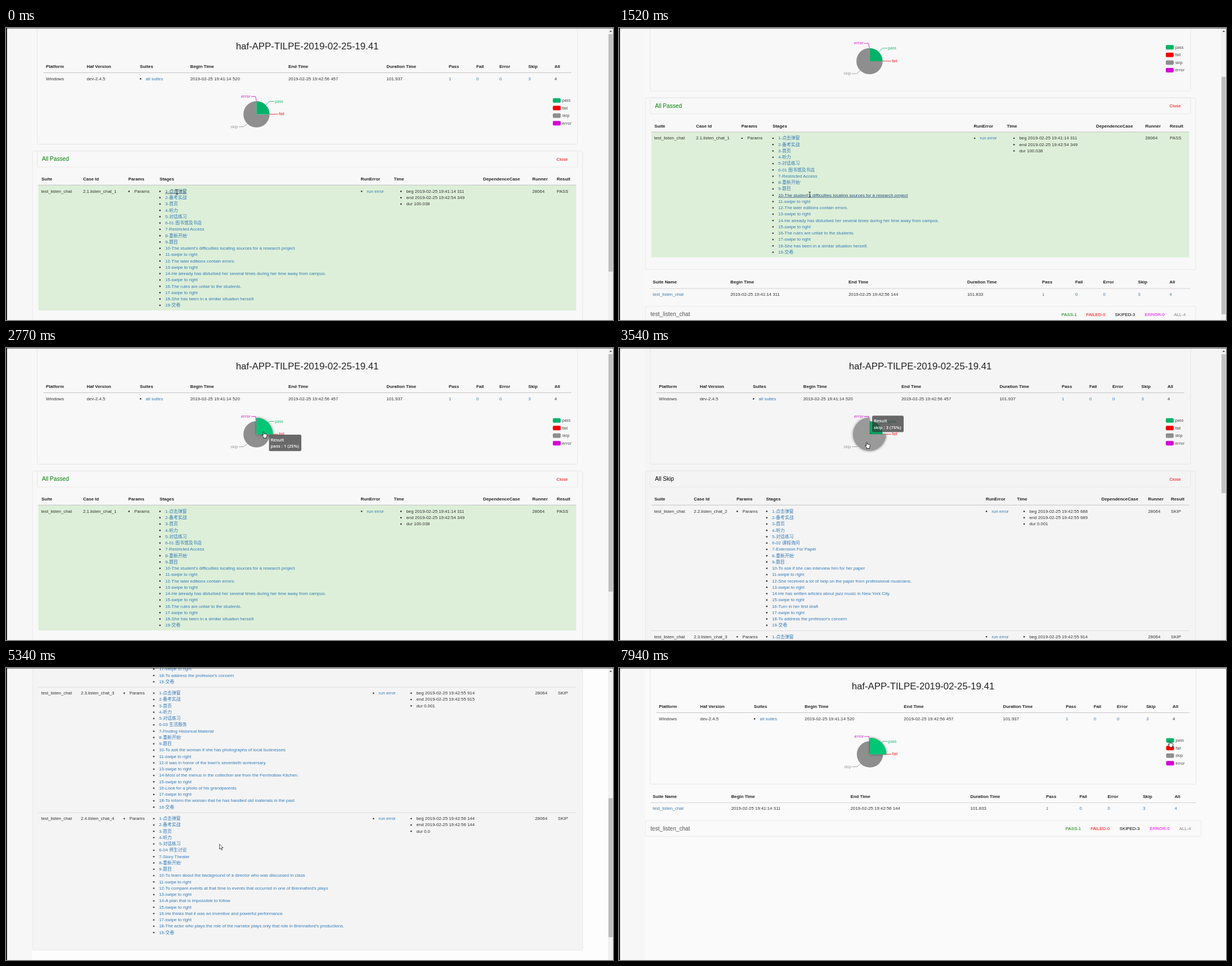
An HTML page for the animation above (8000 ms loop, 1079 by 519 pixels).

```html
<!DOCTYPE html>
<html lang="zh-CN">
<head>
<meta charset="utf-8">
<title>Test report</title>
<style>
html, body { margin: 0; width: 100%; height: 100%; overflow: hidden; background: #f8f8f8; }
svg { display: block; width: 1079px; height: 519px; }
text { font: 7.875px "Liberation Sans", "Noto Sans CJK SC", "Noto Sans CJK", sans-serif; white-space: pre; }
.b { font-weight: bold; }
.h { font-size: 10.125px; }
.title { font-size: 16.8px; text-anchor: middle; }
.chart { font: 7px "Open Sans", "Noto Sans", sans-serif; }
.tip { font: 600 7.8px "Open Sans", "Noto Sans", sans-serif; }
.up { filter: drop-shadow(0 0 2px rgba(0,0,0,.5)); }
</style>
</head>
<body>
<svg id="stage" viewBox="0 0 1079 519"></svg>
<script>
const LOOP = 8000, INK = '#333', LINK = '#337ab7', BORDER = '#e4e4e4';
const LINE = 11.25, ROW = 222.9, VIEW = 525;
const stage = document.getElementById('stage');

// [start, end, count] of each run of screen updates
const bursts = [[860, 1790, 8], [1930, 2910, 8], [3030, 4070, 9], [4200, 5210, 7],
  [5340, 6300, 8], [6450, 7410, 8], [7530, 7940, 4]];
const pointer = [[860, 304, 291.5], [1380, 339, 296], [1940, 339, 296], [2620, 458, 148.5],
  [3030, 458, 148.5], [3280, 440.5, 167], [3820, 440.5, 167], [4070, 379.5, 313],
  [5340, 379.5, 313], [5880, 580.5, 108.5], [6170, 580.5, 108.5], [6700, 987, 231],
  [6900, 987, 231], [7400, 979, 170], [7530, 979, 170], [7930, 979, 129.5]];
const scrolling = [[780, 0], [1500, 94.4], [1930, 94.4], [2350, 0], [4070, 0],
  [4690, 548.5], [5210, 548.5], [5750, 0]];

const open = ['点击弹窗', '备考实战', '首页', '听力', '对话练习'];
const stages = (topic, title, answers) => {
  const list = [...open, topic, title, "重新开始'", '题目'];
  answers.forEach((a, i) => list.push(a, i < 4 ? 'swipe to right' : '交卷'));
  return list.map((s, i) => `${i + 1}-${s}`);
};
const passed = [{
  id: '2.1.listen_chat_1', beg: '41:14 311', end: '42:54 349', dur: '100.038',
  list: stages('01 图书馆及书店', 'Restricted Access', [
    'The student’s difficulties locating sources for a research project',
    'The later editions contain errors.',
    'He already has disturbed her several times during her time away from campus.',
    'The rules are unfair to the students.',
    'She has been in a similar situation herself.'])
}];
const skipped = [{
  id: '2.2.listen_chat_2', beg: '42:55 688', end: '42:55 689', dur: '0.001',
  list: stages('02 课程询问', 'Extension For Paper', [
    'To ask if she can interview him for her paper',
    'She received a lot of help on the paper from professional musicians.',
    'He has written articles about jazz music in New York City.',
    'Turn in her first draft',
    "To address the professor's concern"])
}, {
  id: '2.3.listen_chat_3', beg: '42:55 914', end: '42:55 915', dur: '0.001',
  list: stages('03 生活服务', 'Finding Historical Material', [
    'To ask the woman if she has photographs of local businesses',
    "It was in honor of the town's seventieth anniversary.",
    'Most of the menus in the collection are from the Fernhollow Kitchen.',
    'Look for a photo of his grandparents',
    'To inform the woman that he has handled old materials in the past'])
}, {
  id: '2.4.listen_chat_4', beg: '42:56 144', end: '42:56 144', dur: '0.0',
  list: stages('04 师生讨论', 'Story Theater', [
    'To learn about the background of a director who was discussed in class',
    "To compare events at that time to events that occurred in one of Brennaford's plays",
    'A plan that is impossible to follow',
    'He thinks that it was an inventive and powerful performance.',
    "The actor who plays the role of the narrator plays only that role in Brennaford's productions."])
}];
const modes = {
  pass: { title: 'All Passed', color: '#008000', result: 'PASS', cases: passed, page: '#f8f8f8',
    cols: [63, 137, 217.5, 273, 630.5, 689.5, 848, 935.5, 979], items: [228, 283, 641.5, 711.5] },
  skip: { title: 'All Skip', color: '#000', result: 'SKIP', cases: skipped, page: '#f5f5f5',
    cols: [63, 133, 209, 261.5, 652, 707.5, 857.5, 940.5, 981], items: [219.5, 272, 662.5, 729.5] },
  none: { cases: [], page: '#fafafa' }
};
const slices = [['pass', '#00b268'], ['fail', '#f20505'], ['skip', '#8e8e8e'], ['error', '#d400d4']];

function snap(t) {
  let s = 0;
  for (const [a, b, n] of bursts) {
    const d = (b - a) / (n - 1);
    if (t >= a) s = a + d * Math.min(n - 1, Math.floor((t - a) / d + 0.1));
  }
  return s;
}

function at(track, t) {
  if (t <= track[0][0]) return track[0].slice(1);
  const i = track.findIndex(k => k[0] > t);
  if (i < 0) return track[track.length - 1].slice(1);
  const [a, ...p] = track[i - 1], [b, ...q] = track[i];
  const u = (t - a) / (b - a), e = u * u * (3 - 2 * u);
  return p.map((v, j) => v + (q[j] - v) * e);
}

const text = (x, y, s, fill = INK, cls = '') =>
  `<text x="${x}" y="${y + (cls === 'h' ? 3.6 : 2.8)}" fill="${fill}" class="${cls}">${s}</text>`;
const rect = (x, y, w, h, fill, extra = '') =>
  `<rect x="${x}" y="${y}" width="${w}" height="${h}" fill="${fill}" ${extra}/>`;
const box = (x, y, w, h, fill = 'none') => rect(x, y, w, h, fill, `stroke="${BORDER}" stroke-width=".8" rx="2"`);
const rule = (x1, x2, y, color = '#c4c4c4') => rect(x1, y - 0.5, x2 - x1, 1, color);
const item = (x, y, s, fill, cls) =>
  `<circle cx="${x - 9.3}" cy="${y + 0.4}" r="1.3" fill="${INK}"/>` + text(x, y, s, fill, cls);
const path = (d, fill, stroke = 'none', extra = '') => `<path d="${d}" fill="${fill}" stroke="${stroke}" ${extra}/>`;

function summary(wide) {
  const X = x => x + (wide ? (x - 66) * 0.01 : 0);
  const cols = [71, 143.5, 238, 327.5, 502, 676.5, 787, 836, 877, 928.5, 975];
  const heads = ['Platform', 'Haf Version', 'Suites', 'Begin Time', 'End Time', 'Duration Time',
    'Pass', 'Fail', 'Error', 'Skip', 'All'];
  const vals = ['Windows', 'dev-2.4.5', '', '2019-02-25 19:41:14 520', '2019-02-25 19:42:56 457', '101.937', 1, 0, 0, 3, 4];
  return box(55.5, 0.5, X(1016) - 55.5, 206) +
    `<text x="${wide ? 540.5 : 535.5}" y="38.2" class="title" fill="#222">haf-APP-TILPE-2019-02-25-19.41</text>` +
    cols.map((x, i) => text(X(x), 68.5, heads[i], '#222', 'b') +
      text(X(x), 90, vals[i], i > 5 && i < 10 ? LINK : INK)).join('') +
    item(X(248.5), 90, 'all suites', LINK) + rule(66.5, X(1005), 79.4);
}

function chart(wide, hot) {
  const cx = wide ? 446 : 445.3, cy = 153.4, dx = wide ? 0.6 : 0;
  const wedge = name => {
    const up = name === hot, r = up ? 29.3 : 23.3, big = name === 'skip' ? 1 : 0;
    const from = big ? `${r} 0` : `0 ${-r}`, to = big ? `0 ${-r}` : `${r} 0`;
    const fill = big ? (up ? '#9a9a9a' : '#8e8e8e') : (up ? '#00c775' : '#00b268');
    return path(`M0 0L${from}A${r} ${r} 0 ${big} 1 ${to}Z`, fill, 'none',
      `transform="translate(${cx} ${cy})" ${up ? 'class="up"' : ''}`);
  };
  const order = hot === 'skip' ? ['pass', 'skip'] : ['skip', 'pass'];
  const label = (x, y, i, d) => path(d, 'none', slices[i][1], 'stroke-width=".8"') +
    `<text x="${x}" y="${y}" class="chart" fill="${slices[i][1]}">${slices[i][0]}</text>`;
  const labels = label(478, 132.5, 0, 'M461.7 137L468.5 130.3H477') + label(485, 155, 1, 'M468.5 153.2H483.5') +
    label(399.3, 177.7, 2, 'M429 170L422.5 175.5H414') + label(418, 123.8, 3, 'M445.2 130.2L443.6 121.7H435.5');
  const legend = slices.map(([name, color], i) => rect(972, 124.7 + i * 13.55, 14, 8, color, 'rx="2"') +
    `<text x="988.7" y="${131.1 + i * 13.55}" class="chart" fill="${INK}">${name}</text>`).join('');
  return `<g transform="translate(${dx} 0)">${labels}${legend}</g>` + order.map(wedge).join('');
}

function tooltip(name) {
  const [x, y, w, s] = name === 'pass' ? [467.5, 154, 57.5, 'pass : 1 (25%)'] : [450, 120.3, 56, 'skip : 3 (75%)'];
  return rect(x, y, w, 29.3, 'rgba(50,50,50,.72)', 'rx="2.5"') +
    text(x + 3, y + 8.7, 'Result', '#fff', 'tip') + text(x + 3, y + 20.6, s, '#fff', 'tip');
}

function detail(m, hovered) {
  const heads = ['Suite', 'Case Id', 'Params', 'Stages', 'RunError', 'Time', 'DependenceCase', 'Runner', 'Result'];
  const [px, sx, ex, tx] = m.items, c = m.cols, skip = m.result === 'SKIP';
  let out = box(47, 218.5, 978, 305.5 + (m.cases.length - 1) * ROW, skip ? '#f4f4f4' : 'none') +
    box(55.5, 218.5, 960.5, 28.5) + text(64, 232.5, m.title, m.color, 'h') + text(978.5, 232.7, 'Close', '#f00000') +
    heads.map((h, i) => text(c[i], 268.5, h, '#222', 'b')).join('');
  if (!skip) out += rect(57.5, 279, 956, 223, '#ddefd8');
  out += rule(57.5, 1013.5, 279.2);
  m.cases.forEach((k, i) => {
    const y = 290 + i * ROW;
    if (i) out += rule(57.5, 1013.5, y - 10.4, '#dcdcdc');
    out += text(62.5, y, 'test_listen_chat') + text(c[1], y, k.id) + item(px, y, 'Params') +
      item(ex, y, 'run error', LINK) + text(c[7], y, 28064) + text(c[8], y, m.result);
    k.list.forEach((s, j) => {
      const on = !i && j === hovered;
      out += item(sx, y + j * LINE, on ? `<tspan text-decoration="underline">${s}</tspan>` : s, on ? '#23527c' : LINK);
    });
    [`beg 2019-02-25 19:${k.beg}`, `end 2019-02-25 19:${k.end}`, `dur ${k.dur}`]
      .forEach((s, j) => { out += item(tx, y + j * LINE, s); });
  });
  return out;
}

function suites(y, wide) {
  const X = x => x + (wide ? (x - 60) * 0.01 : 0);
  const cols = [60, 198, 408, 619, 752, 811, 860.5, 922.5, 978.5];
  const heads = ['Suite Name', 'Begin Time', 'End Time', 'Duration Time', 'Pass', 'Fail', 'Error', 'Skip', 'All'];
  const vals = ['test_listen_chat', '2019-02-25 19:41:14 311', '2019-02-25 19:42:56 144', '101.833', 1, 0, 0, 3, 4];
  const totals = [[786.5, 'PASS-1', '#008000'], [830.5, 'FAILED-0', '#f00'], [881.5, 'SKIPED-3', '#000'],
    [934.5, 'ERROR-0', '#f0f'], [986.5, 'ALL-4', '#808080']];
  return cols.map((x, i) => text(X(x), y + 22, heads[i], '#222', 'b') +
      text(X(x), y + 43.4, vals[i], !i || i > 3 ? LINK : INK)).join('') +
    rule(55.5, X(1016), y + 33.4, '#d4d4d4') + box(47, y + 65, X(1025) - 47, 28.3) +
    text(56, y + 79.2, 'test_listen_chat', '#555', 'h') +
    totals.map(([x, s, f]) => text(X(x), y + 79.2, s, f)).join('');
}

function scrollbar(scroll, height) {
  const k = 506 / height;
  return rect(1070, 0, 9, 519, '#f1f1f1') + path('M1072.6 7L1075 4.2L1077.4 7Z', '#555') +
    rect(1071, 11 + scroll * k, 7.5, VIEW * k, scroll ? '#bdbdbd' : '#c1c1c1');
}

function cursor(kind, x, y) {
  const shapes = {
    beam: path('M-2 -4.5Q0 -4.5 0 -3.5Q0 -4.5 2 -4.5M0 -3.5V3.5M-2 4.5Q0 4.5 0 3.5Q0 4.5 2 4.5', 'none', '#222', 'stroke-width=".9"'),
    arrow: path('M0 0V9L2.1 7.1L3.6 10.5L5.1 9.8L3.6 6.5H6.5Z', '#fff', '#222', 'stroke-width=".8"'),
    hand: path('M-.9 .8Q0 -.6 .9 .8V4L2.6 4.1L4.2 4.6L5.7 5.2Q6.2 5.5 6 7L5 9.4V11.5H-.4V10L-2.9 6.7Q-3 5.4 -1.9 5.9L-.9 7Z',
      '#fff', '#111', 'stroke-width=".9" stroke-linejoin="round"')
  };
  return `<g transform="translate(${x} ${y})">${shapes[kind]}</g>`;
}

function scene(t) {
  const name = t < 3400 ? 'pass' : t < 6870 ? 'skip' : 'none';
  const m = modes[name], wide = name === 'none';
  const [scroll] = at(scrolling, t), [x, y] = at(pointer, t);
  const base = wide ? 206 : 524 + (m.cases.length - 1) * ROW;

  const onPie = scroll < 1 && Math.hypot(x - 445.3, y - 153.4) < 24;
  const onLegend = wide && x > 970 && x < 1005 && y < 176;
  const onClose = !wide && scroll < 1 && x > 977 && x < 1000 && Math.abs(y - 232) < 6;
  const slice = x > 445.3 && y < 153.4 ? 'pass' : 'skip';
  const hot = onPie ? slice : onLegend ? slices[Math.max(0, Math.min(3, Math.round((y - 129) / 13.55)))][0] : '';
  const kind = t < 2000 ? 'beam' : onPie || onLegend || onClose ? 'hand' : 'arrow';
  const hovered = kind === 'beam' ? Math.round((y + scroll - 290) / LINE) : -1;

  const page = name === 'skip' && scroll > 200 ? '#fdfdfd' : m.page;
  return rect(0, 0, 1079, 519, page) + rect(0, 0, 46, 519, '#f7f7f7') +
    `<g transform="translate(0 ${-scroll})">` + summary(wide) + chart(wide, hot) +
    (wide ? '' : detail(m, hovered)) + suites(base, wide) + '</g>' +
    (onPie ? tooltip(hot) : '') + (wide ? '' : scrollbar(scroll, base + 105.6)) +
    rect(0, 0, 1079, 0.8, '#444') + rect(0, 0, 1.7, 519, '#000') + cursor(kind, x, y);
}

let shown = -1;
function frame(now) {
  const t = snap(now % LOOP);
  if (t !== shown) stage.innerHTML = scene(shown = t);
  requestAnimationFrame(frame);
}
frame(0);
</script>
</body>
</html>
```
